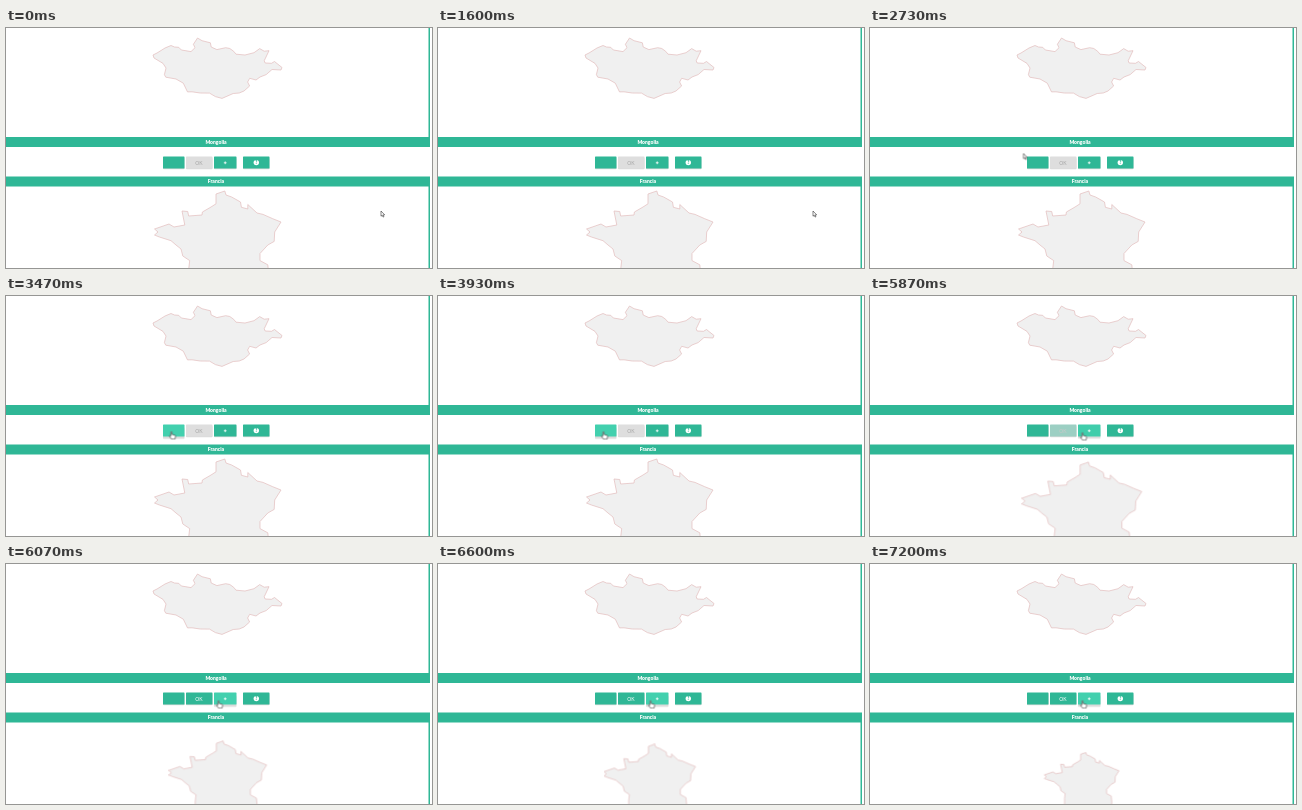
Animation of 426 by 240 pixels, one loop 8000 ms. Source, as an HTML page:

```html
<!DOCTYPE html>
<html lang="es">
<head>
<meta charset="utf-8">
<title>Country shapes</title>
<style>
  html, body { margin: 0; width: 100%; height: 100%; overflow: hidden; background: #fff; }
  svg { display: block; width: 100vw; height: 100vh; }
  text { font-family: Lato, "Open Sans", sans-serif; text-anchor: middle; fill: #fff; }
  .title { font-size: 5px; font-weight: 900; }
  .label { font-size: 5px; }
  .teal { fill: #2fb796; }
  .land { fill: #f0f0f0; stroke: #e3bcbc; stroke-width: .7; stroke-linejoin: round; vector-effect: non-scaling-stroke; }
  .shade { fill: #000; opacity: .14; }
  #francia { transform-origin: 211.5px 225px; }
  #ok { fill: #dedede; }
  #okText { fill: #a6a6a6; }
</style>
</head>
<body>
<svg viewBox="0 0 426 240">
  <path class="land" d="M147 27 151 25 159 20 165 17.5 168.5 19 172.7 19.3 175.4 22 185 23.6 189 19.7 187.4 16.3
    191.5 10 196 12.7 204.4 14.8 205.2 19 210.9 21.6 219.7 19.7 223.8 20.5 227.7 23.3 230 26.2 239 27 248 24.7
    253.7 20.6 258.2 23.2 263 22.7 258.2 32.8 259.2 35 265.5 35.3 268.5 33.5 276 39.5 275 42 266 41.5 260.2 46.6
    254 49 250 52 243.7 50.3 241.6 54 243.6 58 238 63 233.2 65 227.2 65.5 216 70.4 209.4 68.6 203.5 65.1 194.2 65
    186 63.8 181.5 63.9 177.3 55.2 170 51 159.8 49.2 158.4 46.7 160 40 157 35.4 148 30Z"/>
  <path id="francia" class="land" d="M218.8 163 210 166 210 175.8 205 179 196.4 184 196 187 182.7 188 181.7 183.5
    176 183 178.8 197 168 199 163 196 148.5 201 152 204 148.5 207 153.4 209 165 212.7 170 217 175 221 176.8 228
    183.7 232.6 182.7 241 182.7 256.7 177.3 273 187.6 280 201 281.6 211 285 224.7 286 223.7 275 233.5 270 244 273
    255 277 267.7 266.7 268.7 262 262.3 254 262.8 246.8 261.8 236.8 254 232.6 254 225.5 261.8 217 268.2 213.4
    268.7 204 275 194 266.7 190.7 257 186.4 251 185 241.8 176.5 241.8 181 235.4 179.3 234.5 174 225.7 169 220 167Z"/>

  <path class="teal" d="M422.5 0h1.5v119h-424v-10h422.5zM0 148.5h424v91.5h-1.5v-81.5h-422.5z"/>
  <text class="title" x="210" y="116">Mongolia</text>
  <text class="title" x="210" y="154.7">Francia</text>

  <g id="buttons"></g>
  <text id="okText" class="label" x="193" y="136.5">OK</text>
  <path d="M217.8 134.8h2.8M219.2 133.4v2.8" stroke="#fff" stroke-width=".8"/>
  <circle cx="250.3" cy="134.6" r="2.7" fill="#fff"/>
  <text x="250.3" y="136.3" style="font-size:4.5px;font-weight:900;fill:#2fb796">?</text>

  <g id="cursor" stroke="#333" stroke-width=".6" stroke-linejoin="round">
    <path id="arrow" fill="#fff" d="M0 0v5.2l1.2-1 .9 1.9.8-.4-.8-1.8h1.6z"/>
    <path id="hand" fill="#fff" d="M-.6.5q.6-.8 1.2 0v2.6l2.8.6q.8.3.7 1.2l-.5 2.8h-3.6l-2-3q.1-1 1.4-.1z"/>
  </g>
</svg>
<script>
const LOOP = 8000;
const $ = id => document.getElementById(id);

// Button: id, left, width
for (const [id, x, w] of [["minus", 157, 21.5], ["ok", 180, 26.5], ["plus", 208, 22.5], ["help", 237, 26.5]]) {
  $("buttons").innerHTML +=
    `<rect id="${id}Shade" class="shade" x="${x}" y="130" width="${w}" height="11.2" rx=".8"/>
     <rect id="${id}" class="teal" x="${x}" y="128.5" width="${w}" height="12" rx=".6"/>`;
}

// Steps: [ms, value, easing to the next step]
function loop(id, prop, steps) {
  const all = [[0, steps[0][1]], ...steps, [LOOP, steps.at(-1)[1]]];
  const frames = all.map(([ms, value, easing = "linear"]) => ({ offset: ms / LOOP, [prop]: value, easing }));
  $(id).animate(frames, { duration: LOOP, iterations: Infinity });
}

const at = (x, y) => `translate(${x}px, ${y}px)`;
const TEAL = "#2fb796", HOVER = "#42d0ae";

loop("cursor", "transform", [
  [2040, at(375, 183)], [2270, at(310, 142)], [2450, at(225, 103)], [2570, at(172, 91)],
  [2730, at(153.5, 125.5)],
  [3000, at(153.5, 125.5), "ease-in-out"], [3500, at(165.5, 135.5)],
  [5370, at(165.5, 135.5)], [5460, at(176, 122)], [5580, at(200, 120)], [5730, at(212.5, 136.5)]
]);

const HIDE = "0", SHOW = "1";
const hard = (id, steps) => loop(id, "opacity", steps.map(([ms, v]) => [ms, v, "step-end"]));
hard("hand", [[1, HIDE], [3200, SHOW], [5430, HIDE], [5690, SHOW]]);
hard("arrow", [[1, SHOW], [3200, HIDE], [5430, SHOW], [5690, HIDE]]);

function hover(id, from, to) {
  const fade = (a, b) => [[from, a, "ease"], [from + 300, b],
    ...(to ? [[to, b, "ease"], [to + 300, a]] : [])];
  loop(id, "fill", fade(TEAL, HOVER));
  loop(id + "Shade", "transform", fade(at(0, 0), at(0, 1.6)));
}
hover("minus", 3200, 5430);
hover("plus", 5690);

loop("ok", "fill", [[5800, "#dedede", "ease"], [6100, TEAL]]);
loop("okText", "fill", [[5800, "#a6a6a6", "ease"], [6100, "#ffffff"]]);

loop("francia", "transform", [
  [5800, "scale(1)", "ease"], [6250, "scale(.745)"],
  [6570, "scale(.745)", "ease"], [6820, "scale(.59)"]
]);
</script>
</body>
</html>
```
